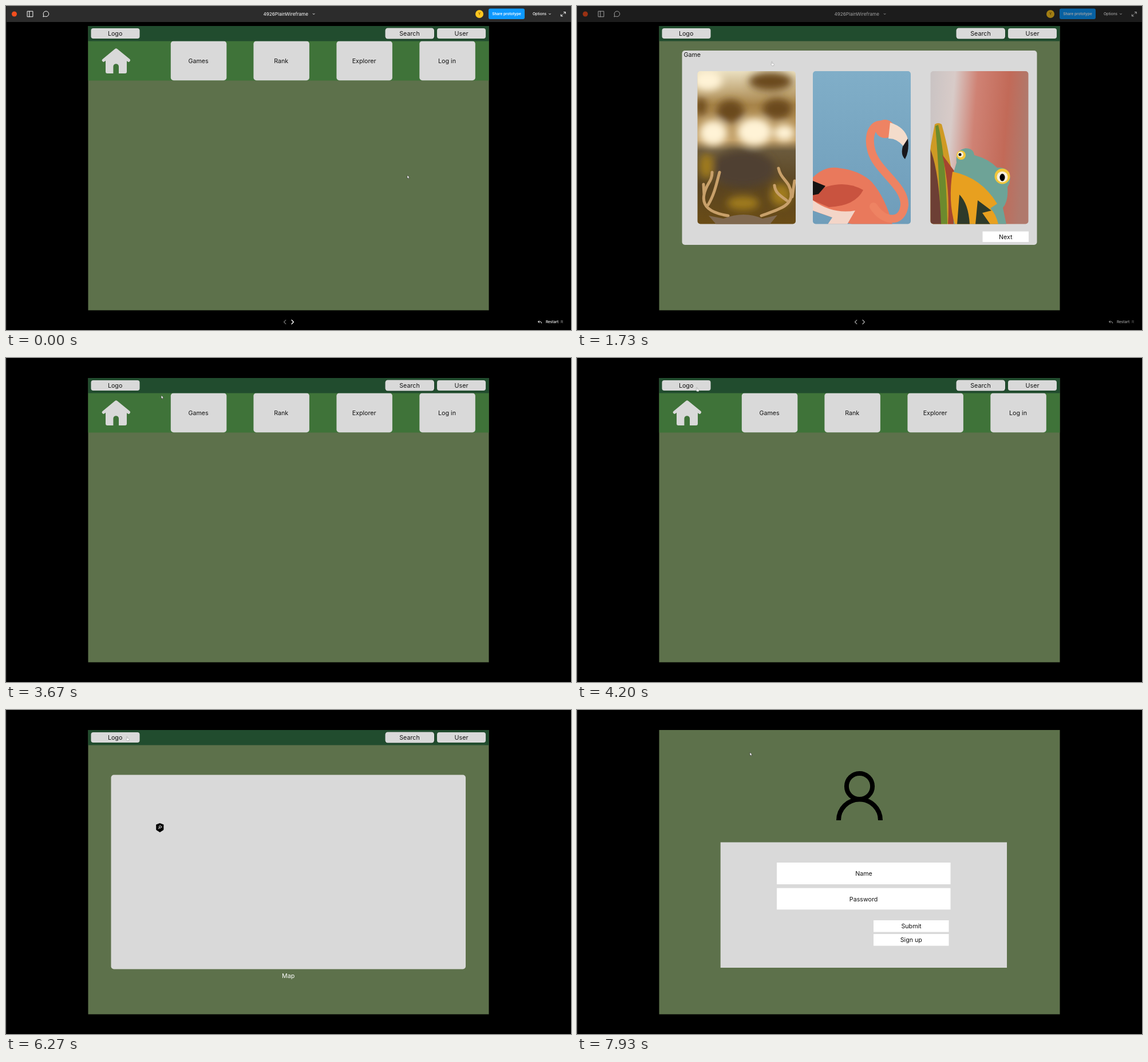
Animation of 987x567 px, one loop 8 s. Source, as an HTML page:

```html
<!DOCTYPE html>
<html lang="en">
<head>
<meta charset="utf-8">
<title>Prototype walkthrough</title>
<style>
html, body { margin: 0; width: 100%; height: 100%; overflow: hidden; background: #000; }
svg { display: block; width: 987px; height: 567px; }
text { font: 10.7px Inter, sans-serif; text-anchor: middle; fill: #111; }
.ui text { font-size: 6.5px; font-weight: 500; fill: #fff; }
.ui .title { font-size: 8.15px; font-weight: 400; }
.line { fill: none; stroke: #fff; stroke-linecap: round; stroke-linejoin: round; }
.grey { fill: #d9d9d9; }
.white { fill: #fff; }
.page { display: none; }
</style>
</head>
<body>
<svg viewBox="0 0 987 567">
  <defs>
    <clipPath id="photos">
      <rect x="210.5" y="114" width="171.5" height="267.5" rx="5"/>
      <rect x="412" y="114" width="171" height="267.5" rx="5"/>
      <rect x="617.5" y="114" width="171" height="267.5" rx="5"/>
    </clipPath>
    <linearGradient id="dusk" x2="0" y2="1">
      <stop offset="0" stop-color="#eadfc0"/>
      <stop offset=".22" stop-color="#a8854a"/>
      <stop offset=".45" stop-color="#c3a068"/>
      <stop offset=".52" stop-color="#6b5a3c"/>
      <stop offset=".75" stop-color="#5a4420"/>
      <stop offset="1" stop-color="#6a4c16"/>
    </linearGradient>
    <linearGradient id="sky" x2="0" y2="1">
      <stop offset="0" stop-color="#80aec8"/>
      <stop offset="1" stop-color="#6f9dba"/>
    </linearGradient>
    <linearGradient id="rose" x2="1" y2=".12">
      <stop offset="0" stop-color="#c9c3c3"/>
      <stop offset=".25" stop-color="#d8cbc8"/>
      <stop offset=".48" stop-color="#cf8274"/>
      <stop offset=".8" stop-color="#c26a58"/>
      <stop offset="1" stop-color="#b0796c"/>
    </linearGradient>
    <filter id="soft" x="-50%" y="-50%" width="200%" height="200%"><feGaussianBlur stdDeviation="7"/></filter>
  </defs>

  <rect width="987" height="567"/>
  <rect width="1" height="567" fill="#1c1c1c"/>

  <g class="ui" id="ui">
    <rect x="1" width="986" height="28" fill="#2c2c2c"/>
    <circle cx="14.5" cy="14" r="4.5" fill="#f24e1e"/>
    <path class="line" d="M37.5 9.2h9.4v9.6h-9.4zM40.8 9.2v9.6"/>
    <path class="line" d="M65 18.6l.6-2.6a4.8 4.8 0 1 1 2.2 2.2z"/>
    <text class="title" x="488.7" y="17">4926PlainWireframe</text>
    <path class="line" d="M536.2 13.4l1.4 1.4 1.4-1.4M948.6 13.4l1.4 1.4 1.4-1.4"/>
    <circle cx="827" cy="14" r="7" fill="#ffc61f"/>
    <text x="827" y="16.3" style="fill:#6b4a00;font-size:6px">Y</text>
    <rect x="843" y="4.5" width="63" height="18.5" rx="3" fill="#0d99ff"/>
    <text x="874.5" y="16.3" style="font-weight:600">Share prototype</text>
    <text x="932" y="16.3">Options</text>
    <path class="line" d="M974.3 10.5h3v3M977 10.8l-2.6 2.6M972.3 17.8h-3v-3M969.6 17.5l2.6-2.6"/>
    <path class="line" id="prev" stroke-width="1.2" d="M488.8 549.6l-3.3 3.4 3.3 3.4"/>
    <path class="line" stroke-width="1.4" d="M499 549.6l3.3 3.4-3.3 3.4"/>
    <path class="line" stroke-width=".9" d="M931.5 550.6l-2 2 2 2M929.7 552.6h4.2q1.8 0 1.8 2.4"/>
    <text x="954" y="555.4">Restart</text>
    <text x="971" y="555.4" style="fill:#888">R</text>
  </g>

  <rect x="143.5" y="35" width="700" height="497.5" fill="#5d714b"/>

  <g class="page" id="menu">
    <rect x="143.5" y="61" width="700" height="69.5" fill="#3f7339"/>
    <g class="grey">
      <path d="M170.5 95L192.2 77l22 18" fill="none" stroke="#d9d9d9" stroke-width="5.5" stroke-linecap="round" stroke-linejoin="round"/>
      <path d="M192.2 77L211 92.5V115q0 3-3 3h-11v-12a4.7 4.7 0 0 0-9.6 0v12H177q-3 0-3-3V92.5z"/>
    </g>
    <g id="nav"></g>
  </g>

  <g class="page" id="game">
    <rect class="grey" x="183.5" y="78" width="620" height="340" rx="5"/>
    <text x="201.3" y="89">Game</text>
    <g clip-path="url(#photos)">
      <rect x="210" y="114" width="173" height="268" fill="url(#dusk)"/>
      <g filter="url(#soft)">
        <g fill="#fff3d6">
          <ellipse cx="228" cy="130" rx="26" ry="18"/>
          <ellipse cx="238" cy="222" rx="24" ry="22"/>
          <ellipse cx="310" cy="220" rx="30" ry="24"/>
          <ellipse cx="362" cy="222" rx="18" ry="14"/>
        </g>
        <g fill="#6b4a1c">
          <ellipse cx="338" cy="132" rx="38" ry="16"/>
          <ellipse cx="268" cy="184" rx="24" ry="20"/>
          <ellipse cx="350" cy="180" rx="26" ry="18"/>
          <ellipse cx="216" cy="176" rx="10" ry="16"/>
        </g>
        <ellipse cx="290" cy="285" rx="55" ry="32" fill="#4f4130"/>
        <g fill="#a07b1d">
          <ellipse cx="290" cy="345" rx="28" ry="12"/>
          <ellipse cx="226" cy="280" rx="12" ry="22"/>
          <ellipse cx="356" cy="330" rx="18" ry="20"/>
        </g>
      </g>
      <g fill="none" stroke="#c8a06a" stroke-width="5" stroke-linecap="round">
        <path d="M264 367C232 362 218 350 222 330S236 308 236 291M229 348C240 330 244 310 249 291M222 330L221 312"/>
        <path d="M322 367C352 356 376 350 374 328S356 304 352 284M366 340C352 330 346 325 345 314M376 334L380 306"/>
      </g>
      <path d="M230 367l26 5q36-14 68 0l26-6-14 17h-92z" fill="#806950"/>

      <rect x="411" y="114" width="173" height="268" fill="url(#sky)"/>
      <path d="M412 300q22-22 48-16 34 4 55 24 24 28 36 74H480l-68-24z" fill="#e9795c"/>
      <path d="M412 326q50-26 88-4-14 28-60 30l-28-12z" fill="#c9533f"/>
      <path d="M412 306l22 9-12 14-10 2z" fill="#151313"/>
      <path d="M412 340q35 25 74 18l-14 24h-34l8-12-34-12z" fill="#f3d5c8"/>
      <path d="M545 213C520 196 506 222 514 252 522 288 574 314 572 349c-4 32-36 30-54 2" fill="none" stroke="#ee8363" stroke-width="14" stroke-linecap="round"/>
      <ellipse cx="538" cy="215" rx="17" ry="16" fill="#ee8363"/>
      <path d="M547 204q26 8 31 29l-8 12q-12-14-26-13z" fill="#f4dccb"/>
      <path d="M578 232q3 22-5 36-8-8-4-22z" fill="#18171b"/>

      <rect x="617" y="114" width="172" height="268" fill="url(#rose)"/>
      <path d="M617 250l8-43q6-4 12 0 14 50 18 90l2 85h-40z" fill="#cf9a24"/>
      <path d="M626 210l5-2q14 60 16 174h-12q-2-90-9-172z" fill="#6c8a2e"/>
      <path d="M617 250q16 40 19 132h-19z" fill="#6d3f35"/>
      <path d="M638 260q14 60 10 122h12V290z" fill="#a5452f"/>
      <path d="M655 300q4-12 8-26-3-22 16-25 14 0 15 12 24 6 40 22 18-2 22 14 2 10-4 20 2 24-8 36l6 29h-92z" fill="#6ea397"/>
      <path d="M656 290q50 10 78 56l-12 8q10 10 14 28h-76q-12-40-4-92z" fill="#e8a01f"/>
      <path d="M668 330q16 16 18 52h-22zM700 340l24 18-16 4 14 20h-26z" fill="#2e3a2a"/>
      <g fill="#f2c63a"><circle cx="671" cy="261" r="8"/><circle cx="743" cy="298" r="13.5"/></g>
      <g fill="#f7efdc"><circle cx="670" cy="260" r="5"/><circle cx="743" cy="299" r="9.5"/></g>
      <ellipse cx="743" cy="300" rx="4.5" ry="6.5"/><circle cx="669" cy="260" r="2.5"/>
    </g>
    <rect class="white" x="708.5" y="394.5" width="80.5" height="18.5"/>
    <text x="748.7" y="408">Next</text>
  </g>

  <g class="page" id="rank">
    <rect class="grey" x="183.5" y="78" width="620" height="434" rx="5"/>
  </g>

  <g class="page" id="map">
    <rect class="grey" x="183.5" y="113.5" width="619.5" height="340" rx="5"/>
    <path d="M268.8 198l6.6 2.4v8.4q0 1-1 1.6l-5.6 3.6-5.6-3.6q-1-.6-1-1.6v-8.4z"/>
    <circle class="line" cx="269.4" cy="204.6" r="2"/>
    <path class="line" d="M267.8 206.2l-1.6 1.7"/>
    <text class="white" x="493.2" y="468.7" style="fill:#fff">Map</text>
  </g>

  <g id="top">
    <rect x="143.5" y="35" width="700" height="26.5" fill="#214c2e"/>
    <rect x="662" y="38" width="87" height="20.4" rx="5" fill="#173a22"/>
    <g class="grey">
      <rect x="148.5" y="39" width="85" height="18" rx="4"/>
      <rect x="662.5" y="38.5" width="85.5" height="19" rx="4.5"/>
      <rect x="753" y="39" width="85" height="18" rx="4"/>
    </g>
    <text x="190.6" y="52">Logo</text>
    <text x="705" y="52">Search</text>
    <text x="795.5" y="52">User</text>
  </g>

  <g class="page" id="login">
    <g fill="none" stroke="#000" stroke-width="8">
      <circle cx="493.5" cy="133.5" r="22.6"/>
      <path d="M457 193a36.5 36.5 0 0 1 73 0"/>
    </g>
    <rect class="grey" x="250.7" y="231.5" width="500.3" height="219.5"/>
    <g class="white">
      <rect x="349" y="267" width="303.5" height="38"/>
      <rect x="349" y="311.7" width="303.5" height="37.5"/>
      <rect x="518" y="368" width="131.5" height="20.5"/>
      <rect x="518" y="392" width="131.5" height="20.6"/>
    </g>
    <text x="501" y="290.3">Name</text>
    <text x="500.6" y="334.6">Password</text>
    <text x="584" y="382.4">Submit</text>
    <text x="583.8" y="406.4">Sign up</text>
  </g>

  <g id="cursor" fill="#fff" stroke="#222" stroke-width=".5">
    <path id="arrow" d="M0 0v6l1.4-1.2.9 2 1-.5-.9-1.9h1.8z"/>
    <path id="hand" stroke="#888" d="M.8.6Q1.4-.2 2 .6v2.6l2.4.6q.8.2.7 1L4.6 7.6H1.6L-.2 5.2q0-1 1 -.4z"/>
  </g>
</svg>
<script>
const $ = id => document.getElementById(id);
const LOOP = 8000, STEP = 1000 / 15;

const pages = [
  [0, 'menu'], [1650, 'game'], [2650, 'menu'], [3710, 'rank'],
  [4110, 'menu'], [5050, 'map'], [6310, 'menu'], [7310, 'login']
];

// Pointer moves: start, end, x, y
const moves = [
  [0, 0, 701, 296],
  [5, 470, 198, 94],
  [670, 870, 190, 43],
  [1070, 1500, 339, 97],
  [1940, 2330, 203, 56],
  [2410, 2530, 208, 50],
  [2610, 3130, 478, 112],
  [3340, 3930, 208, 51],
  [4200, 4730, 612, 96],
  [5470, 5730, 213, 62],
  [5870, 6070, 210, 46],
  [6410, 6930, 758, 108],
  [7470, 7930, 302, 74]
];

const W = 97.5, H = 69;
const buttons = [['Games', 287.8], ['Rank', 432.4], ['Explorer', 577.4], ['Log in', 722.3]].map(([label, x]) => {
  const g = document.createElementNS('http://www.w3.org/2000/svg', 'g');
  const box = (dx, dy, w, h, attrs) => `<rect x="${x + dx}" y="${61.3 + dy}" width="${w}" height="${h}" rx="5" ${attrs}/>`;
  g.innerHTML = box(.5, .5, W - .5, H, 'fill="#24421f"') + box(0, 0, W, H, 'class="grey"') +
    `<text x="${x + W / 2 - .5}" y="99.9">${label}</text>`;
  $('nav').append(g);
  return { x, shade: g.children[0], face: g.children[1] };
});

const pageAt = t => pages.findLast(p => p[0] <= t)[1];
const clamp = v => Math.min(1, Math.max(0, v));
const inside = (b, x, y) => x > b.x && x < b.x + W && y > 61 && y < 130;

function pointerAt(t) {
  const i = moves.findLastIndex(m => m[0] <= t);
  const [start, end, x, y] = moves[i];
  const from = moves[Math.max(0, i - 1)];
  const k = end > start ? 1 - (1 - clamp((t - start) / (end - start))) ** 1.8 : 1;
  return { x: from[2] + (x - from[2]) * k, y: from[3] + (y - from[3]) * k, end };
}

function draw(t) {
  const page = pageAt(t);
  for (const [, id] of pages) $(id).style.display = id === page ? 'inline' : 'none';
  $('top').style.display = page === 'login' ? 'none' : 'inline';
  $('ui').style.opacity = 1 - clamp((t - 1660) / 200);
  $('prev').style.opacity = page === 'menu' ? .45 : 1;

  const { x, y, end } = pointerAt(t);
  for (const b of buttons) {
    const over = inside(b, x, y), d = over ? 1 : 0;
    b.shade.style.display = over ? 'inline' : 'none';
    b.face.setAttribute('x', b.x + d);
    b.face.setAttribute('y', 61.3 + d * .7);
    b.face.setAttribute('width', W - 2 * d);
    b.face.setAttribute('height', H - 2 * d);
  }

  // A resting pointer keeps the shape it had on arrival.
  const seen = pageAt(Math.min(t, end));
  const onLogo = seen !== 'login' && x > 148 && x < 234 && y > 39 && y < 57;
  const hand = onLogo || seen === 'menu' && buttons.some(b => inside(b, x, y));
  $('cursor').setAttribute('transform', `translate(${x} ${y})`);
  $('hand').style.display = hand ? 'inline' : 'none';
  $('arrow').style.display = hand ? 'none' : 'inline';
}

function tick() {
  const t = performance.now() % LOOP;
  draw(Math.floor(t / STEP + .1) * STEP);
  requestAnimationFrame(tick);
}
tick();
</script>
</body>
</html>
```
